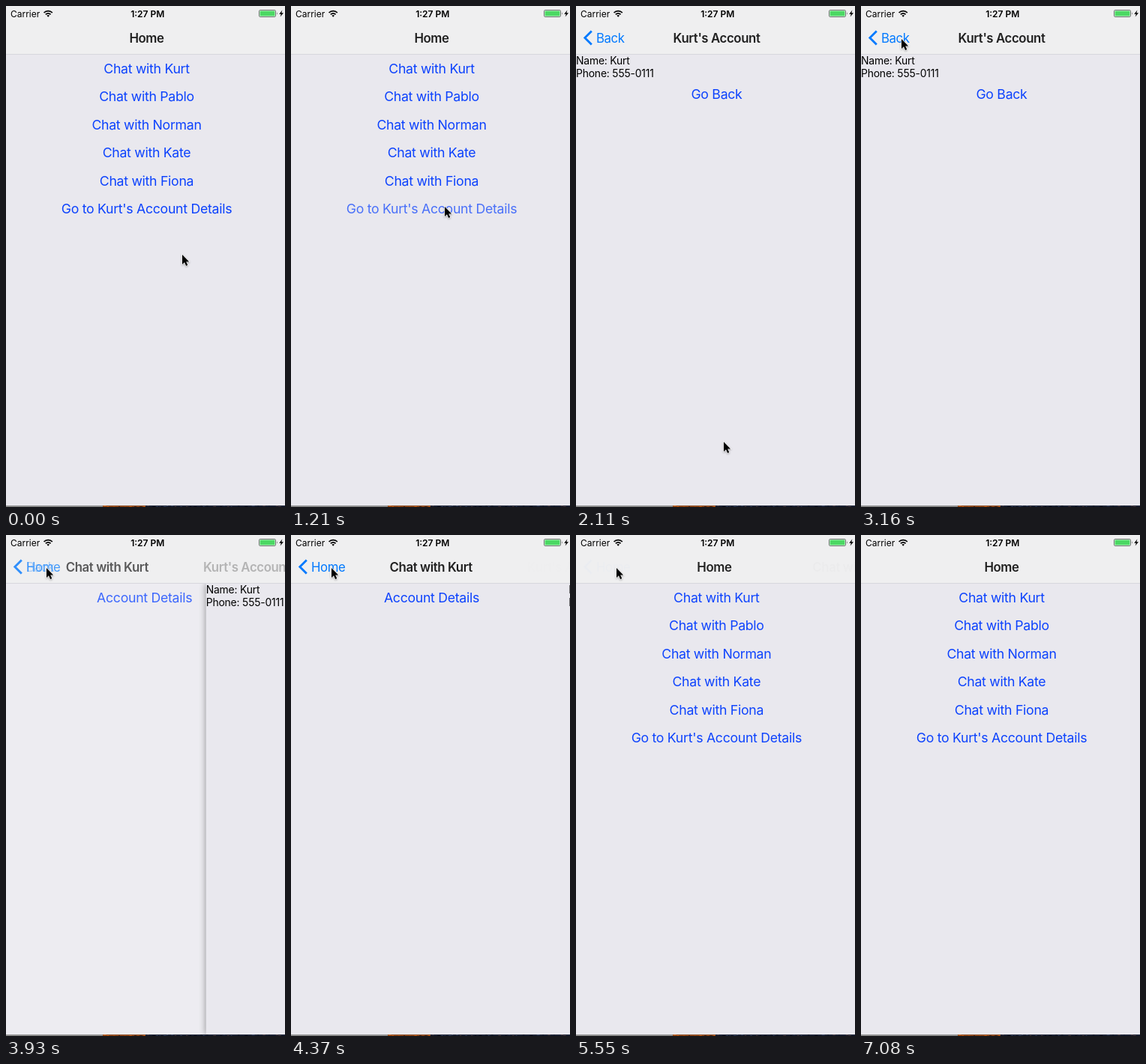
An HTML page that plays this animation: 372x669 px, repeating every 7120 ms.

```html
<!DOCTYPE html>
<html lang="en">
<head>
<meta charset="utf-8">
<title>Chat navigation</title>
<style>
  html, body { margin: 0; width: 100%; height: 100%; overflow: hidden; background: #fff; }
  svg { display: block; width: 372px; height: 669px; font-family: Inter, "Liberation Sans", sans-serif; }
  text { white-space: pre; }
  .button { font-size: 17.7px; letter-spacing: -.29px; fill: #0c42fd; text-anchor: middle; }
  .title { font-size: 16.8px; letter-spacing: -.4px; font-weight: 600; fill: #000; fill-opacity: .87; text-anchor: middle; }
  .back { font-size: 16.8px; letter-spacing: -.4px; fill: #037aff; }
  .body { font-size: 13.9px; letter-spacing: -.18px; }
  .status { font-size: 12px; }
</style>
</head>
<body>
<svg viewBox="0 0 372 669">
  <defs>
    <clipPath id="page"><rect y="64" width="372" height="603"/></clipPath>
    <filter id="blur" filterUnits="userSpaceOnUse" x="-30" y="40" width="440" height="660">
      <feGaussianBlur stdDeviation="5"/>
    </filter>
  </defs>
  <rect width="372" height="669" fill="#fff"/>
  <g id="cards" clip-path="url(#page)"></g>
  <rect width="372" height="64" fill="#efeff0"/>
  <rect y="64" width="372" height="1" fill="#d7d7dd"/>
  <g id="heads"></g>

  <g class="status">
    <text x="6" y="14.5">Carrier</text>
    <text x="188.7" y="14.5" font-weight="600" text-anchor="middle">1:27 PM</text>
  </g>
  <g fill="none" stroke="#000" stroke-width="1.8">
    <path d="M50.6 9A7.7 7.7 0 0 1 61.8 9"/>
    <path d="M52.9 11.4A4.5 4.5 0 0 1 59.5 11.4"/>
  </g>
  <path d="M56.2 14.8L54.4 12.8A2.7 2.7 0 0 1 58 12.8Z"/>
  <rect x="337.5" y="5.5" width="22" height="9" rx="1.6" fill="#fff" stroke="#6f7472"/>
  <rect x="338.5" y="6.5" width="20" height="7" rx=".6" fill="#4cd964"/>
  <path d="M361 8.3Q362.6 10 361 11.7Z" fill="#555"/>
  <path d="M368.4 5.6L364.2 10.8H366.8L365.6 14.6L370 9.2H367.3Z"/>

  <g id="strip">
    <rect y="667" width="129" height="2" fill="#8c8c8c"/>
    <rect x="129" y="667" width="57" height="2" fill="#8c4a20"/>
    <rect x="186" y="667" width="186" height="2" fill="#1c2233"/>
  </g>
  <g id="cursor">
    <path d="M0 0V13L3 10.3L5.1 15L7.3 14L5.2 9.4H9.2Z" stroke="#fff" stroke-width="1.2"
      paint-order="stroke" style="filter:drop-shadow(0 1px 1px rgba(0,0,0,.3))"/>
  </g>
</svg>
<script>
const LOOP = 7120, WIDTH = 372, MID = 187.5, SLIDE = 800;
const PUSH = 1242, POP_ACCOUNT = 3736, POP_CHAT = 5048;
const $ = id => document.getElementById(id);

function add(parent, tag, attrs = {}, label) {
  const el = document.createElementNS('http://www.w3.org/2000/svg', tag);
  for (const key in attrs) el.setAttribute(key, attrs[key]);
  if (label) el.textContent = label;
  return parent.appendChild(el);
}

function makeScene(title, backLabel) {
  const card = add($('cards'), 'g');
  const shadow = add(card, 'rect', { y: 65, width: WIDTH, height: 602, filter: 'url(#blur)' });
  add(card, 'rect', { y: 64, width: WIDTH, height: 603, fill: '#e9e8ee' });
  const head = add($('heads'), 'g');
  const name = add(head, 'text', { class: 'title', x: MID, y: 48.5 }, title);
  const left = add(head, 'g');
  if (backLabel) {
    add(left, 'path', { d: 'M20.8 33.4L11.8 42.4L20.8 51.4', fill: 'none', stroke: '#037aff', 'stroke-width': 2.8 });
    add(left, 'text', { class: 'back', x: 27, y: 48.5 }, backLabel);
  }
  return { card, shadow, head, name, left };
}

const button = (scene, y, label) => add(scene.card, 'text', { class: 'button', x: MID, y }, label);

const home = makeScene('Home');
const chat = makeScene('Chat with Kurt', 'Home');
const account = makeScene("Kurt's Account", 'Back');
const scenes = [home, chat, account];

['Kurt', 'Pablo', 'Norman', 'Kate', 'Fiona'].forEach((who, i) => button(home, 89.5 + 37.5 * i, 'Chat with ' + who));
const goTo = button(home, 277, "Go to Kurt's Account Details");
button(chat, 89.5, 'Account Details');
add(account.card, 'text', { class: 'body', x: 0, y: 77.5 }, 'Name: Kurt');
add(account.card, 'text', { class: 'body', x: 0, y: 94.5 }, 'Phone: 555-0111');
button(account, 123.5, 'Go Back');

// Specks of the desktop below the window
let seed = 7;
const random = () => (seed = seed * 16807 % 2147483647) / 2147483647;
for (let x = 130; x < 370; x += 3 + random() * 7) {
  const tones = x < 184 ? ['#c8641c', '#4a2a1c', '#a5561f'] : ['#0c101c', '#34405c', '#4a3a3c'];
  add($('strip'), 'rect', { x, y: 667 + Math.floor(random() * 2), width: 1 + random() * 3, height: 1, fill: tones[Math.floor(random() * 3)] });
}

const clamp = v => Math.min(1, Math.max(0, v));
const mix = (a, b, k) => a + (b - a) * k;
const smooth = k => k * k * (3 - 2 * k);
const cubic = (a, b, s) => 3 * (1 - s) ** 2 * s * a + 3 * (1 - s) * s * s * b + s ** 3;

function slide(t, start) {
  const k = clamp((t - start) / SLIDE);
  if (k === 0 || k === 1) return k;
  let lo = 0, hi = 1;
  for (let i = 0; i < 24; i++) {
    const s = (lo + hi) / 2;
    if (cubic(.2833, .31833, s) < k) lo = s; else hi = s;
  }
  return cubic(.99, .99, lo);
}

// Touch feedback: fades to 20 % and recovers on release
function touch(t, down, up, fade) {
  if (t < down) return 1;
  if (t < up) return mix(1, .2, smooth(clamp((t - down) / fade)));
  return mix(.2, 1, smooth(clamp((t - up) / 250)));
}

const track = [
  [360, 235, 332], [800, 205, 268], [1240, 205, 268], [1540, 199, 577.5],
  [1990, 199, 577.5], [2110, 197, 582], [2300, 197, 582], [2810, 111, 197],
  [2940, 111, 197], [3155, 54, 44], [6270, 54, 44], [6420, 125, 577], [6530, 204, 673]
];

function cursorAt(t) {
  const i = track.findIndex(p => p[0] > t);
  if (i === 0) return track[0].slice(1);
  if (i < 0) return track[track.length - 1].slice(1);
  const [t0, x0, y0] = track[i - 1], [t1, x1, y1] = track[i];
  const k = smooth((t - t0) / (t1 - t0));
  return [mix(x0, x1, k), mix(y0, y1, k)];
}

const move = (el, x, y = 0) => el.setAttribute('transform', `translate(${x.toFixed(2)} ${y.toFixed(2)})`);

// offset: 1 = off to the right, 0 = in place, -1 = covered by the next scene
function place(scene, offset) {
  const shown = 1 - Math.abs(offset);
  move(scene.card, offset > 0 ? offset * WIDTH : offset * 10);
  scene.card.setAttribute('opacity', offset < 0 ? 1 + .7 * offset : 1);
  scene.shadow.setAttribute('opacity', .42 * clamp((.98 - offset) * 8));
  move(scene.name, offset * WIDTH / 2);
  scene.name.setAttribute('opacity', shown);
  scene.left.setAttribute('opacity', shown);
}

function draw(t) {
  let under = home, over = account, depth = slide(t, PUSH);
  if (t >= POP_CHAT) { over = chat; depth = 1 - slide(t, POP_CHAT); }
  else if (t >= POP_ACCOUNT) { under = chat; depth = 1 - slide(t, POP_ACCOUNT); }

  for (const scene of scenes) {
    const visible = scene === under || scene === over && depth > 0;
    scene.card.setAttribute('display', visible ? 'inline' : 'none');
    scene.head.setAttribute('display', visible ? 'inline' : 'none');
  }
  place(under, -depth);
  place(over, 1 - depth);

  goTo.setAttribute('opacity', touch(t, 930, 1060, 130));
  const fade = (scene, k) => scene.left.setAttribute('opacity', scene.left.getAttribute('opacity') * k);
  fade(account, touch(t, 3515, 3690, 1));
  fade(chat, touch(t, 4885, 5050, 1));

  move($('cursor'), ...cursorAt(t));
}

const begin = performance.now();
function tick() {
  draw((performance.now() - begin) % LOOP);
  requestAnimationFrame(tick);
}
tick();
</script>
</body>
</html>
```
